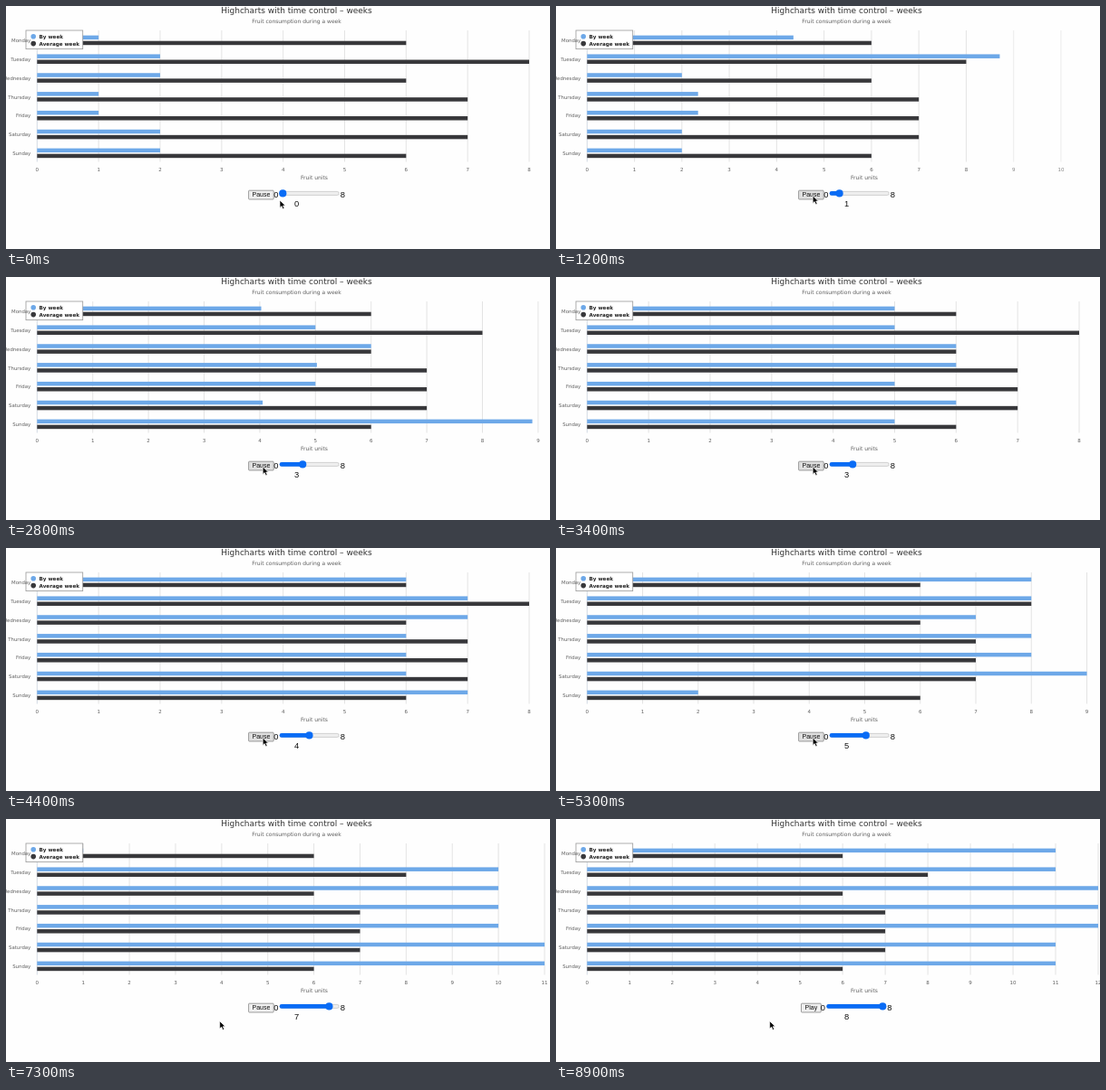
Animation, 600 px wide and 269 px high, one loop 9 s. Source, as an HTML page:

```html
<!DOCTYPE html>
<html lang="en">
<head>
<meta charset="utf-8">
<title>Weekly fruit chart</title>
<style>
  html, body { margin: 0; width: 100%; height: 100%; overflow: hidden; background: #fefefe; }
  svg { display: block; width: 600px; height: 269px; }
  text { font-family: "DejaVu Sans", sans-serif; fill: #606060; }
  .control { font-family: "Liberation Sans", Arial, sans-serif; fill: #111; }
</style>
</head>
<body>
<svg id="stage" viewBox="0 0 600 269"></svg>
<script>
const LOOP = 9000, FRAME = 100, DURATION = 500;
const LEFT = 34.3, ROW = 20.83;
const days = ["Monday", "Tuesday", "Wednesday", "Thursday", "Friday", "Saturday", "Sunday"];
const average = [6, 8, 6, 7, 7, 7, 6];
const weeks = [
  [1, 2, 2, 1, 1, 2, 2],
  [6, 12, 2, 3, 3, 2, 2],
  [4, 5, 6, 5, 5, 4, 9],
  [5, 5, 6, 6, 5, 6, 5],
  [6, 7, 7, 6, 6, 6, 7],
  [8, 8, 7, 8, 8, 9, 2],
  [9, 10, 4, 10, 9, 9, 9],
  [1, 10, 10, 10, 10, 11, 11],
  [11, 11, 12, 12, 12, 11, 11]
];
const starts = [-DURATION, 868, 1790, 2751, 3750, 4750, 5750, 6750, 7750];
// The plot grows a little as the last axis label changes.
const plotWidths = { 8: 542.7, 9: 551.2, 10: 555.2, 11: 559.7, 12: 563.7 };

const stage = document.getElementById("stage");

function add(parent, tag, attrs, content) {
  const node = document.createElementNS("http://www.w3.org/2000/svg", tag);
  set(node, attrs);
  if (content !== undefined) node.textContent = content;
  parent.appendChild(node);
  return node;
}
function set(node, attrs) {
  for (const key in attrs) node.setAttribute(key, attrs[key]);
}
function label(parent, content, x, y, size, attrs) {
  return add(parent, "text", { x, y, "font-size": size, "text-anchor": "middle", ...attrs }, content);
}
const mix = (a, b, p) => a + (b - a) * p;
const clamp = x => Math.max(0, Math.min(1, x));
const ease = x => (1 - Math.cos(Math.PI * clamp(x))) / 2;
const axisMax = week => Math.max(...weeks[week], ...average);
const unitOf = week => plotWidths[axisMax(week)] / axisMax(week);

// Axis and bars
const ticks = Array.from({ length: 13 }, (_, value) => {
  const group = add(stage, "g", {});
  add(group, "line", { y1: 27, y2: 172.5, stroke: value ? "#dedede" : "#c8d2de", "stroke-width": 0.8 });
  label(group, value, 0, 183, 5.5);
  return group;
});
const bars = days.map((day, i) => {
  const y = 32.6 + i * ROW;
  const bar = (top, fill) => add(stage, "rect", { x: LEFT, y: top, height: 4.5, fill });
  return { week: bar(y, "#6da8e8"), average: bar(y + 6.1, "#38383b") };
});

// Legend
add(stage, "rect", { x: 22, y: 27, width: 62.7, height: 20.6, fill: "#fff", stroke: "#999", "stroke-width": 0.8 });
[["By week", "#6da8e8", 33.8], ["Average week", "#38383b", 41.6]].forEach(([name, fill, y]) => {
  add(stage, "circle", { cx: 30.2, cy: y, r: 2.8, fill });
  label(stage, name, 36.6, y + 2.1, 5.6, { "text-anchor": "start", "font-weight": "bold", style: "fill:#222" });
});

// Titles and day names
label(stage, "Highcharts with time control – weeks", 320.5, 8.2, 9, { style: "fill:#333" });
label(stage, "Fruit consumption during a week", 320.5, 19, 6);
label(stage, "Fruit units", 340, 192.3, 6);
days.forEach((day, i) => label(stage, day, 27.3, 40.1 + i * ROW, 5.4, { "text-anchor": "end" }));

// Time control
const button = add(stage, "rect", { y: 204.2, height: 9.8, rx: 0.8, stroke: "#868686", "stroke-width": 0.8 });
const buttonText = label(stage, "Pause", 281.4, 211.4, 7, { class: "control" });
const slider = add(stage, "g", {});
label(slider, "0", 297.8, 211.8, 9.4, { class: "control" });
label(slider, "8", 371.3, 211.8, 9.4, { class: "control" });
add(slider, "rect", { x: 302, y: 205.4, width: 65.3, height: 4, rx: 2, fill: "#efefef", stroke: "#b8b8b8", "stroke-width": 0.6 });
const fill = add(slider, "rect", { x: 301.7, y: 205.1, height: 4.6, rx: 2.3, fill: "#0a6cf5" });
const thumb = add(slider, "circle", { cy: 207.4, r: 4.1, fill: "#0a6cf5" });
const counter = label(stage, "0", 320.6, 222.2, 9.4, { class: "control" });

const cursor = add(stage, "path", {
  d: "M0 0V8.4L2 6.6L3.4 9.8L5 9.1L3.6 6H6.2Z",
  fill: "#000", stroke: "#fff", "stroke-width": 0.7
});

function drawTicks(from, to, p) {
  const unit = mix(unitOf(from), unitOf(to), p);
  ticks.forEach((tick, value) => {
    const before = value <= axisMax(from), after = value <= axisMax(to);
    set(tick, {
      transform: `translate(${LEFT + value * unit} 0)`,
      opacity: mix(+before, +after, p)
    });
  });
}

function drawBars(from, to, p) {
  const length = (a, b) => mix(a * unitOf(from), b * unitOf(to), p);
  bars.forEach((bar, i) => {
    set(bar.week, { width: length(weeks[from][i], weeks[to][i]) });
    set(bar.average, { width: length(average[i], average[i]) });
  });
}

function drawControls(t, week) {
  const ended = week === weeks.length - 1;
  const arrive = ease((t - 50) / 450), leave = ease((t - 5700) / 600);
  const x = mix(mix(302, 283.2, arrive), 235.7, leave);
  const y = mix(mix(215, 210, arrive), 223.7, leave);
  const hover = x > 267 && x < 295.5 && y < 214;
  const width = ended ? 21.8 : 27.6;
  set(button, { x: 281.4 - width / 2, width, fill: hover ? "#dfdfdf" : "#efefef" });
  buttonText.textContent = ended ? "Play" : "Pause";
  set(slider, { transform: `translate(${ended ? -3.4 : 0} 0)` });
  const position = 305.3 + 7.3 * week;
  set(thumb, { cx: position });
  set(fill, { width: position - 301.7 });
  counter.textContent = week;
  set(cursor, { transform: `translate(${x} ${y})` });
}

function render(time) {
  const t = Math.floor((time % LOOP) / FRAME) * FRAME;
  const week = starts.filter(start => start <= t).length - 1;
  const previous = Math.max(0, week - 1);
  const p = ease((t - starts[week]) / DURATION);
  drawTicks(previous, week, p);
  drawBars(previous, week, p);
  drawControls(t, week);
}

let begin;
function loop(now) {
  begin ??= now;
  render(now - begin);
  requestAnimationFrame(loop);
}
render(0);
requestAnimationFrame(loop);
</script>
</body>
</html>
```
